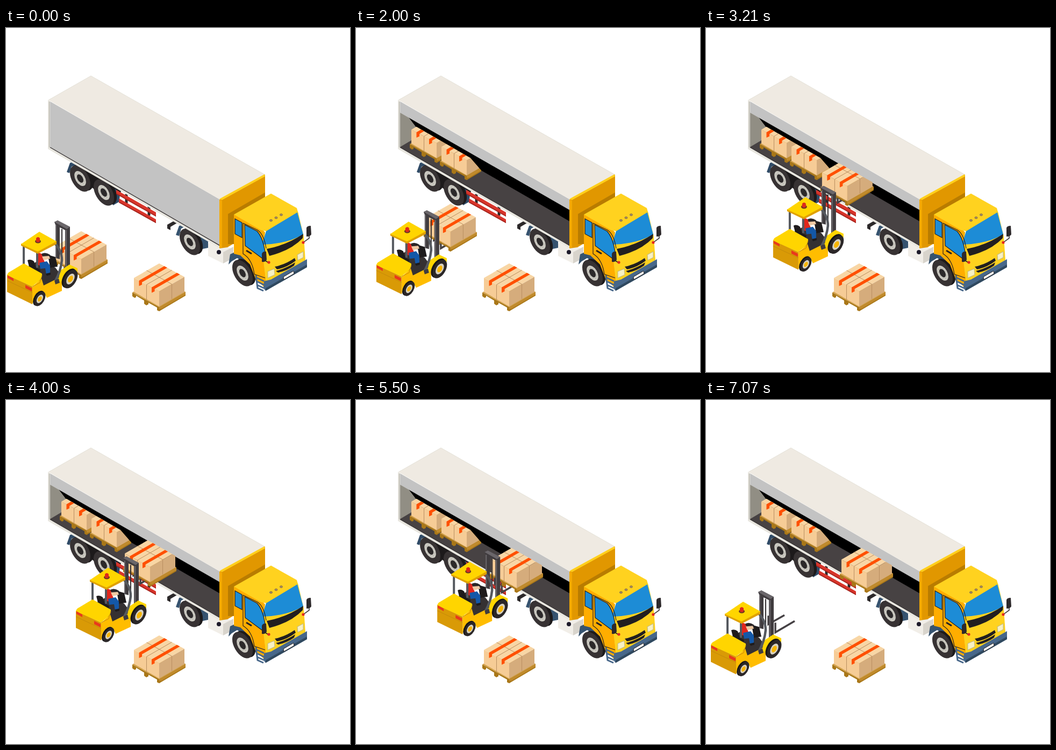
An HTML page for the animation above (7.28 s loop, 640 by 640 pixels).

```html
<!DOCTYPE html>
<html lang="en">
<head>
<meta charset="utf-8">
<title>Loading a truck</title>
<style>
html, body { margin: 0; width: 100%; height: 100%; overflow: hidden; background: #fff; }
svg { display: block; width: 100vw; height: 100vh; }
</style>
</head>
<body>
<svg viewBox="0 0 640 640">
<defs>
  <clipPath id="underPanel"><path d="M0 112L81 157 398 337 640 474V640H0z"/></clipPath>
  <clipPath id="inTrailer"><path d="M81 166L113 184 213 242 233 265V300H81z"/></clipPath>

  <!-- pallet with four cartons; origin is the top corner of the cartons -->
  <g id="pallet">
    <path fill="#a97718" d="M-50 54L0 81 49 53V60L5 86 0 89-4 87V82L-20 73V76L-24 78-28 75V69L-43 60V63L-46 64-50 61z"/>
    <path fill="#d29f45" d="M-50 54L0 26 49 53 0 81z"/>
    <path fill="#c08a2c" d="M0 81L49 53V58L5 84 0 85z"/>
    <path fill="#f8d6a5" d="M0 0L47 25 0 52-47 27z"/>
    <path fill="#f6cc96" d="M-47 27L0 52V80L-47 53z"/>
    <path fill="#d5ac7c" d="M47 25V53L0 80V52z"/>
    <path fill="none" stroke="#b98e60" d="M-23.500 68V39.500L23.500 12.500M-23.500 13L23.500 38.500V66"/>
    <path id="tape" fill="#ff5000" d="M-37.500 32L9.500 5 15 8-32 35V39.500L-37.500 42z"/>
    <use href="#tape" x="23.500" y="12.500"/>
  </g>

  <g id="truckWheel">
    <circle r="22" cx="6" cy="-5" transform="matrix(.866 .5 0 1 0 0)" fill="#1d1a1b"/>
    <g transform="matrix(.866 .5 0 1 0 0)">
      <circle r="22" fill="#373233"/>
      <circle r="12.500" fill="#cbc9c1"/>
      <circle r="9" fill="none" stroke="#a3a19a" stroke-dasharray="2 4"/>
      <circle r="7" fill="#2c292a"/>
    </g>
  </g>
  <g id="liftWheel">
    <g transform="matrix(.866 -.5 0 1 0 0)">
      <circle r="16" cx="-3" cy="-3" fill="#171516"/>
      <circle r="15.500" fill="#2b2728"/>
      <circle r="9" fill="#d8d2c0"/>
      <circle r="5.500" fill="#f7b500"/>
    </g>
  </g>
</defs>

<!-- chassis -->
<path fill="#1d1a1b" d="M120 246L215 300 208 325 196 322 150 290z"/>
<path fill="#2f4a66" d="M113 268L119 251 128 248 132 254 122 258 118 270zM196 294L212 306 211 323 199 330z"/>
<path fill="#36536f" d="M316 385L322 368 336 364 376 389V409L361 412 355 378 334 369 326 373 322 387z"/>
<path fill="#2c292a" d="M300 366L316 357 323 360 306 370V376L300 373z"/>
<use href="#truckWheel" x="138" y="280"/>
<use href="#truckWheel" x="182" y="306"/>
<use href="#truckWheel" x="342" y="398"/>
<path stroke="#2c292a" stroke-width="5" d="M224 309V326M266 332V349"/>
<path fill="#d8342a" d="M205 301L279 343V350L205 308zM210 317L279 356V363L210 324z"/>
<path fill="#a3231d" d="M205 307L279 349V351L205 309zM210 323L279 361V363L210 325z"/>
<path fill="#f1eee8" d="M376 401L386 396 423 412V428L404 438 376 424z"/>
<path fill="#d8d4cc" d="M404 417L423 407V428L404 438z"/>
<circle cx="396" cy="417" r="4" fill="#1e1b2a"/>

<!-- trailer inside -->
<path fill="#474243" d="M81 137L398 320V405L81 222z"/>
<path fill="#918e84" d="M81 150L97 160 113 185V203L81 222z"/>
<path d="M90 152L398 327V360L233 265 170 228 113 186 97 165z"/>
<g clip-path="url(#inTrailer)">
  <use href="#pallet" x="150" y="162"/>
  <use href="#pallet" x="206" y="194"/>
</g>
<path id="panel" fill="#c3c3c3"/>
<path fill="#efeae2" d="M79 134L158 89 482 273 398 319z"/>
<path fill="none" stroke="#d9d6ca" stroke-width=".6" d="M79 134L158 89 482 273"/>
<path fill="#e8e6df" d="M78 134L82 136V222L398 405V410L78 225z"/>
<path fill="none" stroke="#a9a89f" d="M80.500 137V222"/>
<path fill="none" stroke="#343031" stroke-width="1.300" d="M82 222L398 405"/>
<path fill="#e19700" d="M398 319L482 273V366L412 408 398 410z"/>
<path fill="#b97c00" d="M413 346L482 306V340L427 372V402L413 402z"/>
<path fill="#ffcf1c" d="M397 318L481 272 482 276 402 320z"/>
<path fill="#f4a900" d="M397 319L402 321V408L397 410z"/>

<!-- cab -->
<path fill="#36536f" d="M414 440L417 421 430 415 450 425 470 452 466 472 450 440 430 428 420 434z"/>
<use href="#truckWheel" x="440" y="456"/>
<path fill="#ffad00" d="M424 347L476 374 482 380 478 418 484 472 480 482 464 466 454 440 436 423 424 420z"/>
<path fill="#ffd21f" d="M424 347L493 308 541 335 543 342 484 378 474 376z"/>
<path fill="#ffd21f" d="M484 376L543 341 554 388 557 432 484 474 477 418z"/>
<path fill="#1d8cd6" d="M484 378L542 343 553 384Q522 402 476 403z"/>
<path fill="#221f20" d="M485 411Q522 404 553 383L552 391Q530 414 490 424z"/>
<path fill="#1d8cd6" stroke="#252122" stroke-width="1.200" d="M426 355L439 362V390L426 383zM444 366L467 378Q478 390 482 417L476 428 445 405z"/>
<path fill="none" stroke="#252122" stroke-width="1.200" d="M441 363V420Q458 430 462 458L482 465M441 363L468 376Q480 384 484 410"/>
<path stroke="#252122" stroke-width="3" d="M447 414L457 420"/>
<path fill="#221f20" d="M500 444Q520 440 537 428L539 433Q522 446 504 449zM502 452Q522 447 538 436L536 442Q522 452 506 455z"/>
<path fill="#f7f1c4" stroke="#b9b48d" d="M487 453L499 448 500 459 487 465zM542 422L553 416V427L543 432z"/>
<path fill="#47678a" d="M480 471L493 468 560 430V445L483 489 479 484z"/>
<path fill="#30495f" d="M483 484L560 440V445L483 489z"/>
<path fill="#fff" stroke="#252122" d="M516 463L535 452 536 457 517 468z"/>
<path fill="none" stroke="#47678a" stroke-width="3" d="M465 460L468 484 479 489M465 464L480 471M466 471L480 478M467 478L480 484"/>
<g fill="#a98e62" stroke="#80694a">
  <ellipse cx="493" cy="358" rx="2.500" ry="1.800"/>
  <ellipse cx="502.500" cy="353" rx="2.500" ry="1.800"/>
  <ellipse cx="512" cy="347.500" rx="2.500" ry="1.800"/>
</g>
<path fill="none" stroke="#252122" stroke-width="1.500" d="M564 386V391L553 399M481 432L489 437"/>
<path fill="#2d292b" d="M559 372Q560 368 567 368L568 384Q566 388 559 388zM476 420Q478 415 484 416L485 431Q483 436 476 435z"/>
<g fill="#e2291d"><circle cx="553" cy="399" r="2.600"/><circle cx="489" cy="436" r="2.600"/></g>

<use href="#pallet" x="285" y="438"/>

<g id="forks" fill="none" stroke="#454144" stroke-width="3.500">
  <path d="M109 430V446L139 429M122 443V461L158 440"/>
</g>
<g clip-path="url(#underPanel)"><use id="load" href="#pallet"/></g>

<g id="forklift">
  <!-- mast -->
  <path fill="#403c3f" d="M90 361L96 358 119 370V441L110 446V376L100 371V430L92 428V366z"/>
  <path fill="#6a666a" d="M90 361L96 358 119 370 113 374zM92 366H94V428H92zM111 376H113V444H111z"/>
  <path stroke="#332f31" stroke-width="2" d="M104 374V436"/>
  <!-- cabin -->
  <path fill="#353132" d="M38 445L62 432 92 446 104 462 70 482 58 468z"/>
  <path fill="#1e1b1c" d="M40 432Q46 429 52 434L56 446 64 450 62 458 44 448zM78 422L92 426 96 444 82 446z"/>
  <path fill="none" stroke="#55595f" stroke-width="4" d="M33 403V440"/>
  <path fill="#e1261c" d="M56 420Q62 416 67 421L72 436 64 442 56 440z"/>
  <path fill="#1458a8" d="M62 437L76 434 82 442 82 456 75 459 73 447 64 448z"/>
  <path fill="#2a2627" d="M66 420Q74 416 82 422L84 430 70 430z"/>
  <path fill="#efc9a3" d="M67 425L80 424 82 429 70 432z"/>
  <path fill="#1e1b1c" d="M74 457L83 455V459L76 461z"/>
  <path fill="none" stroke="#55595f" stroke-width="4" d="M58 415V446"/>
  <!-- body -->
  <path fill="#ffbd00" d="M49 482L66 466 70 479 104 462V489L76 502 72 494Q60 488 53 502L49 514z"/>
  <path fill="#d99a06" d="M2 459L49 481V514L2 491z"/>
  <path fill="#ffd500" d="M2 460Q3 455 8 453L33 438 67 457Q68 464 62 470L49 481z"/>
  <path fill="none" stroke="#c58a0a" d="M49 481L63 474 67 460M2 470L49 492"/>
  <path fill="#e8391d" d="M3 460L14 466V471L3 465zM36 478L48 484V490L36 484z"/>
  <path fill="#ffd500" d="M100 452L118 440 133 447 133 454Q112 450 105 470L97 474z"/>
  <use href="#liftWheel" x="120" y="467"/>
  <use href="#liftWheel" transform="translate(63 504) scale(.78)"/>
  <!-- guard and roof -->
  <path fill="none" stroke="#55595f" stroke-width="4.500" d="M88 398Q104 412 104 432 102 452 92 470"/>
  <path fill="#403c3f" d="M90 470L98 466 100 474 92 477z"/>
  <path fill="#e0a100" d="M28 401L59 415 94 396V402L59 420 28 405z"/>
  <path fill="#ffd500" d="M28 402L62 379 94 397 59 416z"/>
  <ellipse cx="59.500" cy="397" rx="5.500" ry="3.500" fill="#6b3a22"/>
  <path fill="#dc2a1c" d="M56 397V391Q59.500 387 63 391V397Q59.500 400 56 397z"/>
</g>
</svg>
<script>
const LOOP = 7280, STEPS = 102, SLOPE = 0.523;
const el = id => document.getElementById(id);
const [panel, forks, load, forklift] = ["panel", "forks", "load", "forklift"].map(el);

// progress from 0 to 1 between steps a and b
const part = (k, a, b) => Math.min(1, Math.max(0, (k - a) / (b - a)));
const move = (node, x, y) => node.setAttribute("transform", `translate(${x} ${y})`);

function draw(time) {
  // steps start on whole 10 ms, slightly ahead of an even division
  const k = Math.floor(time % LOOP / LOOP * STEPS + 0.06);

  const edge = 222 - 65 * part(k, 0, 11);
  panel.setAttribute("d", `M81 136L398 319V${edge + 182}L81 ${edge}z`);

  const carried = 128 * part(k, 21, 46) + 31 * part(k, 65, 73);
  const back = 152 * (1 - (1 - part(k, 76, 99)) ** 1.5);
  const lift = 74 * part(k, 14, 46) - 49 * part(k, 49, 65);
  const x = carried - back;

  move(forklift, x, -SLOPE * x);
  move(forks, x, -SLOPE * x - lift);
  move(load, 140 + carried, 378 - SLOPE * carried - lift);
}

const start = performance.now();
(function tick() {
  draw(performance.now() - start);
  requestAnimationFrame(tick);
})();
</script>
</body>
</html>
```
